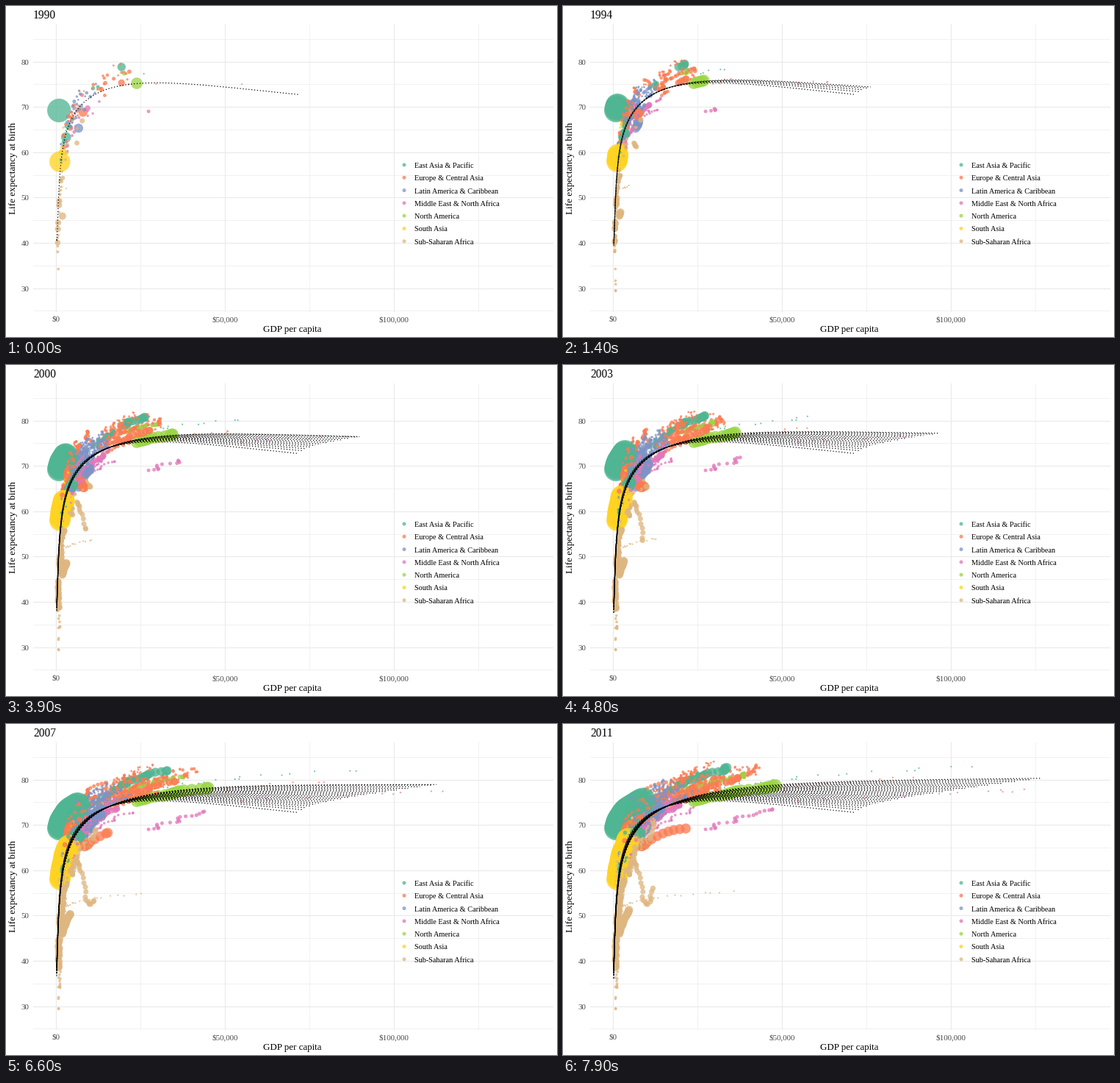
Recreate the animation shown at these times as a matplotlib script. Size 750 by 450 pixels, loop 8000 ms.

```python
import numpy as np
import matplotlib.pyplot as plt
from matplotlib.animation import FuncAnimation

W, H, DPI = 750, 450, 100
FRAMES, INTERVAL = 80, 100
YEAR_STEP = 26 / 99
SPAN = 21
SERIF = "Liberation Serif"
ALPHA = 0.76

REGIONS = ["East Asia & Pacific", "Europe & Central Asia",
           "Latin America & Caribbean", "Middle East & North Africa",
           "North America", "South Asia", "Sub-Saharan Africa"]
COLORS = np.array(["#4fb592", "#fb7b52", "#7d94c6", "#e277b9",
                   "#9ad643", "#ffd321", "#deb680"])
EAP, ECA, LAC, MENA, NAM, SAS, SSA = range(7)

# Landmarks: region, population (millions), income (k$) and life expectancy
# at start and end, then depth and year of a crisis if there was one
LANDMARKS = [
    (EAP, 1135, .9, 69.2, 9.4, 75.4),
    (SAS, 870, 1.15, 57.9, 4.7, 66.9),
    (NAM, 250, 23.9, 75.2, 50, 78.7),
    (EAP, 181, 3, 63.3, 8.4, 68.5),
    (LAC, 149, 6.7, 65.3, 14.6, 73.8),
    (ECA, 148, 8, 68.9, 23.3, 69.5, 4, 11),
    (EAP, 123, 19.4, 78.8, 35, 82.7),
    (SAS, 108, 2, 60, 4.3, 65.5),
    (SSA, 95, 1.9, 45.9, 4.9, 51.3),
    (ECA, 79, 19.4, 75.3, 39, 80.6),
    (SSA, 37, 6.2, 62.1, 12.2, 60, 8, 15),
    (NAM, 28, 20.2, 77.4, 41, 81.3),
    (SSA, 7, .7, 39, 1.2, 62, 13, 3),
    (MENA, 16, 27.4, 69, 47.5, 73.8),
    (MENA, .5, 55, 75, 127.6, 77.5),
    (EAP, .5, 26, 77.3, 111.5, 82.9),
    (ECA, .4, 29.6, 75.1, 93, 80.5),
    (SSA, .5, 3, 52, 38, 55.4),
]

# Other countries: region, count, median income, its log spread,
# life expectancy above the trend
GROUPS = [
    (EAP, 16, 3, .8, 0),
    (ECA, 16, 17.5, .16, 1.8),
    (ECA, 26, 5.5, .5, .8),
    (LAC, 30, 5.8, .45, 1.3),
    (MENA, 15, 7, .7, -2),
    (SAS, 4, 1.5, .4, 1),
    (SSA, 42, 1.2, .7, -4),
]

# Trend of life expectancy over log income, at start and end
INCOME = np.log([.22, .87, 2.6, 7, 21, 72, 130])
TREND_A = np.polyfit(INCOME, [40.8, 51.7, 63, 70, 74.9, 72.7, 69.5], 6)
TREND_B = np.polyfit(INCOME, [36, 51, 61.2, 68.8, 75.6, 79.7, 80.4], 6)


def px(income):
    return 68 + 4.6 * income


def py(life):
    return 75.5 + 6.16 * (80 - life)


def trend(income, t):
    mix = (t / SPAN) ** 0.75
    u = np.log(income)
    return (1 - mix) * np.polyval(TREND_A, u) + mix * np.polyval(TREND_B, u)


def trend_line(t):
    top = 71.8 + 0.9 * t + 0.084 * t * t
    g = np.geomspace(0.22, top, 220)
    return px(g), py(trend(g, t))


def countries(rng):
    rows = [r + (0, 10) if len(r) == 6 else r for r in LANDMARKS]
    for region, n, income, spread, above in GROUPS:
        for _ in range(n):
            g = max(income * np.exp(spread * rng.normal()), 0.3)
            life = trend(g, 0) + above + 1.5 * np.clip(rng.normal(), -2, 2)
            pop = min(6 * np.exp(1.1 * rng.normal()), 58)
            growth = np.exp(rng.normal(0.65, 0.2))
            gain = rng.normal(5, 1)
            dip = abs(rng.normal(0, 4)) if region == SSA else 0
            rows.append((region, pop, g, life, g * growth, life + gain,
                         dip, 12))
    return np.array(sorted(rows, key=lambda r: -r[1]))


rng = np.random.default_rng(12)
REGION, POP, G0, L0, G1, L1, DIP, WHEN = countries(rng).T
REGION = REGION.astype(int)
FACE = COLORS[REGION]
PHASE = rng.uniform(0, 2 * np.pi, (2, len(POP)))
SPEED = rng.uniform(0.8, 2, len(POP))
SHAKE = 1 / (1 + POP / 50)
SLUMP = np.where((REGION == ECA) & (G0 < 12), 0.5, 0)


def state(t):
    """Pixel positions and marker areas of all countries at t years."""
    s = t / SPAN
    wave = np.sin(SPEED * t + PHASE) - np.sin(PHASE)
    boom = np.sin(2 * np.pi * (t - 15) / 8)
    g = G0 * (G1 / G0) ** s * np.exp(-SLUMP * np.sin(np.pi * s))
    g *= 1 + 0.03 * boom * min(s * 4, 1) + 0.035 * SHAKE * wave[0]
    crisis = DIP * np.exp(-((t - WHEN) / (2 + WHEN / 3)) ** 2)
    life = L0 + (L1 - L0) * s - crisis + 0.2 * SHAKE * wave[1]
    r = np.maximum(0.6 + 0.46 * np.sqrt(POP * 1.01 ** t), 1.1)
    return np.column_stack([px(g), py(life)]), (1.44 * r) ** 2


fig = plt.figure(figsize=(W / DPI, H / DPI), dpi=DPI, facecolor="white")
ax = fig.add_axes([0, 0, 1, 1])
ax.set_xlim(0, W)
ax.set_ylim(H, 0)
ax.axis("off")


def label(x, y, text, size, color="black", **kw):
    kw.setdefault("va", "center_baseline")
    return ax.text(x, y, text, fontsize=size * 0.72, family=SERIF,
                   color=color, parse_math=False, zorder=6, **kw)


def grid(xs, ys, major):
    ax.plot(xs, ys, color="#ebebeb", lw=0.9 if major else 0.5, zorder=0)


# Grid and axis labels
for g in range(0, 126, 25):
    major = g % 50 == 0
    grid([px(g)] * 2, [25, 415], major)
    if major:
        label(px(g), 425, f"${g * 1000:,}", 11, "#4d4d4d", ha="center")
for life in range(25, 86, 5):
    major = life % 10 == 0
    grid([37, 744], [py(life)] * 2, major)
    if major:
        label(31.5, py(life) + 0.5, str(life), 11, "#4d4d4d", ha="right")
label(390, 438, "GDP per capita", 13, ha="center")
label(10, 220.5, "Life expectancy at birth", 13.1, ha="center",
      va="center", rotation=90)
title = label(37, 17, "1990", 15.5, va="baseline")

# Legend
rows = 216 + 17.3 * np.arange(7)
ax.scatter([542] * 7, rows, s=(1.44 * 2.5) ** 2, c=COLORS, alpha=ALPHA,
           lw=0, zorder=5)
for y, name in zip(rows, REGIONS):
    label(556, y + 0.5, name, 10.28)

dots = ax.scatter([], [], lw=0, alpha=ALPHA, zorder=2)


def dotted(t, shift=0.0):
    return ax.plot(*trend_line(t), color="black", lw=0.88, zorder=3,
                   ls=(shift, (1, 2.2)), dash_capstyle="butt")[0]


YEARS = range(SPAN + 1)
past = [state(y) for y in YEARS]
past_lines = [dotted(y, rng.uniform(0, 3.2)) for y in YEARS]
now_line = dotted(0)


def update(frame):
    t = frame * YEAR_STEP
    done = int(np.ceil(t))
    layers = past[:done] + [state(t)]
    dots.set_offsets(np.vstack([p for p, _ in layers]))
    dots.set_sizes(np.concatenate([s for _, s in layers]))
    dots.set_facecolor(np.tile(FACE, len(layers)))
    for y, line in enumerate(past_lines):
        line.set_visible(y < done)
    now_line.set_data(*trend_line(t))
    title.set_text(str(round(1990 + t)))


anim = FuncAnimation(fig, update, frames=FRAMES, interval=INTERVAL,
                     repeat=True, repeat_delay=0, blit=False)
plt.show()
```
